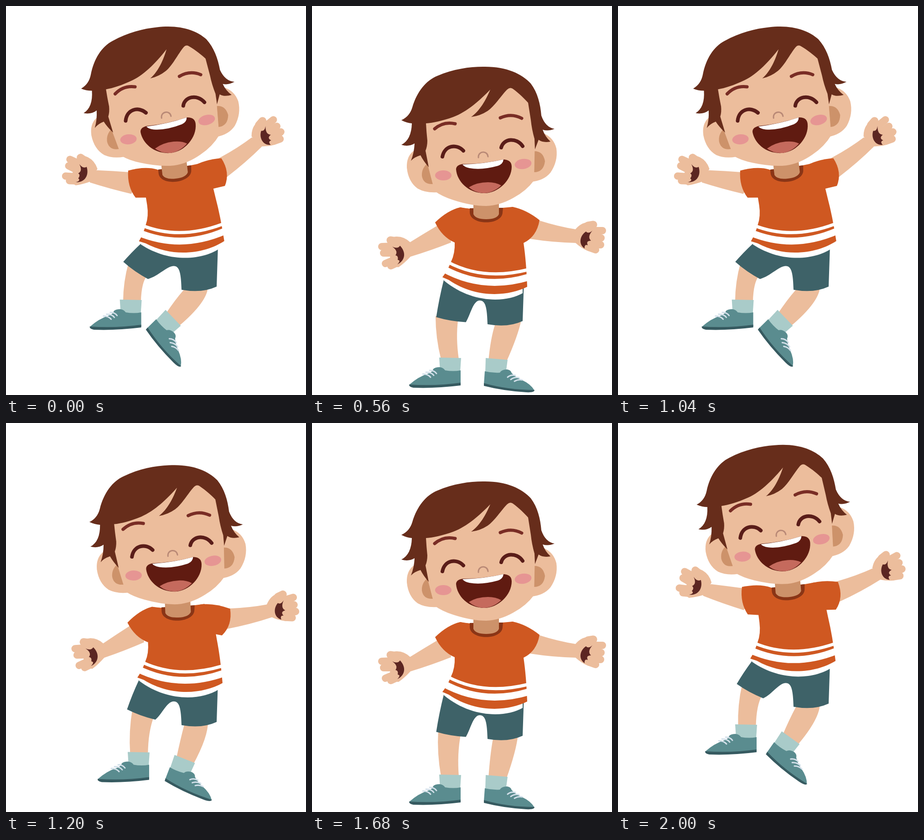
Animation of 658 by 852 pixels, one loop 2.08 s. Source, as an HTML page with a canvas:

```html
<!DOCTYPE html>
<html lang="en">
<head>
<meta charset="utf-8">
<title>Jumping boy</title>
<style>
html, body { margin: 0; width: 100%; height: 100%; overflow: hidden; background: #fff; }
canvas { display: block; }
</style>
</head>
<body>
<canvas id="c" width="658" height="852"></canvas>
<script>
const ctx = document.getElementById('c').getContext('2d');
const SKIN = '#ecbd9c', SHADE = '#cd926a', HAIR = '#672d1b', SHIRT = '#cf5821',
  COLLAR = '#8a3516', SHORTS = '#3e6268', SOCK = '#a9cbc9', SHOE = '#5a8c8f',
  SOLE = '#365a60', LACE = '#d3e0ea', DARK = '#5c2622', WHITE = '#fff';

const STEP = 80;
// One jump, one value per step, measured from the crouch.
const JUMP = {
  body:  [-89.5, -67, -41, -19, -6, 1, 2.5, 0, -5, -18, -44, -71, -86],
  feet:  [-127, -92, -49.5, -13, 0, 0, 0, 0, 0, -13, -48, -83, -110],
  swing: [41.4, 29, 17, 5.2, 0, 0, 0, 0, 0, 4, 11, 20, 31],
  left:  [34.5, 20, -2, -6.5, -5, -3, -1, 0, 0, 5, 17, 29, 38.5],
  right: [-46, -34, -19.6, -5, 0, 1, 1, 0, 0, -5, -13, -22, -33.4],
  knee:  [0, 0, 0, 0, 0.5, 1, 1.15, 1, 0.55, 0, 0, 0, 0]
};
const COUNT = JUMP.body.length;

function fill(d, color) {
  ctx.fillStyle = color;
  ctx.fill(new Path2D(d));
}

function line(d, color, width) {
  ctx.strokeStyle = color;
  ctx.lineWidth = width;
  ctx.stroke(new Path2D(d));
}

function oval(x, y, rx, ry, tilt, color) {
  ctx.fillStyle = color;
  ctx.beginPath();
  ctx.ellipse(x, y, rx, ry, tilt, 0, Math.PI * 2);
  ctx.fill();
}

// A joint moves its rest point (px, py) to (x, y) and turns around it.
function joint(px, py, x, y, deg) {
  const r = deg * Math.PI / 180, c = Math.cos(r), s = Math.sin(r);
  return {
    point: (a, b) => [x + (a - px) * c - (b - py) * s, y + (a - px) * s + (b - py) * c],
    draw(fn) {
      ctx.save();
      ctx.translate(x, y);
      ctx.rotate(r);
      ctx.translate(-px, -py);
      fn();
      ctx.restore();
    }
  };
}

// Hangs a part on its parent at a rest point, with its own angle.
const hang = (parent, px, py, deg) => joint(px, py, ...parent.point(px, py), deg);

function leftHand() {
  fill('M216 518Q203 505 186 505Q170 505 168 525L172 556Q176 572 190 572Q203 563 216 549Z', SKIN);
  line('M185 515L172 513', SKIN, 17);
  line('M180 526L153 527M178 541L157 541', SKIN, 16);
  line('M180 556L161 564M188 562L173 569', SKIN, 16);
  fill('M176 527Q188 533 193 525C206 538 206 557 187 566Q196 557 188 556Q190 547 183 546Q190 537 176 527Z', DARK);
}

function rightHand() {
  fill('M577 490Q590 474 606 474Q620 478 622 495L620 525Q616 540 604 536Q590 530 577 518Z', SKIN);
  line('M605 481L617 479', SKIN, 17);
  line('M612 492L637 492M612 508L634 508', SKIN, 16);
  line('M612 523L633 523M608 529L622 534', SKIN, 16);
  fill('M615 492Q606 500 601 494C587 503 584 522 598 531Q597 521 605 524Q600 514 612 514Q603 506 615 492Z', DARK);
}

function leftShoe() {
  fill('M279 770L327 771L325 801L281 801Z', SOCK);
  fill('M214 829Q233 812 255 805Q265 801 266 795Q270 791 280 791Q288 792 292 798Q310 801 326 798V829L218 834Z', SHOE);
  fill('M213 829Q270 833 326 825V831Q270 838 222 836Q212 834 213 829Z', SOLE);
  line('M243 806Q254 806 260 813M250 802Q262 802 267 809M258 798Q268 798 273 805', LACE, 3);
}

function rightShoe() {
  fill('M381 771L429 775L425 805L380 803Z', SOCK);
  fill('M377 828L379 800Q395 804 412 803Q416 796 428 796Q436 797 438 804Q445 812 460 819Q480 828 488 842L470 845Q420 840 377 829Z', SHOE);
  fill('M377 826Q430 841 488 841Q488 847 470 846Q420 843 377 832Z', SOLE);
  line('M429 813Q436 807 446 809M436 818Q444 812 454 814M444 822Q452 817 461 819', LACE, 3);
}

function torso() {
  fill('M462 610V629C425 650 350 652 289 601L300 590Z', WHITE);
  fill('M310 450L325 441Q336 444 347 444L418 442Q430 441 440 440L455 446L464 519Q470 560 472 615' +
    'C430 636 360 641 300 600L286 594Q297 580 305 560Q314 542 313 517Z', SHIRT);
  ctx.lineCap = 'butt';
  line('M298 561Q375 602 472 578', WHITE, 7);
  line('M287 575Q375 624 475 594', WHITE, 15);
  ctx.lineCap = 'round';
}

function neck() {
  fill('M346 443V452C347 481 417 481 418 452L419 442Z', COLLAR);
  fill('M354 425H410V456Q405 467 382 467Q359 467 354 456Z', SHADE);
}

function head() {
  fill('M250 310L222 318Q207 330 208 354Q211 385 232 400Q250 410 275 408L290 350Z', SKIN);
  fill('M480 285L508 279Q530 288 536 312Q540 340 523 365Q508 383 480 385Z', SKIN);
  fill('M253 345Q240 356 241 372Q244 391 265 390Z', SHADE);
  fill('M488 318Q507 318 511 340Q508 364 487 364Z', SHADE);
  fill('M245 240L380 165L440 165L480 205L489 290L487 382Q470 405 442 420Q412 437 382 438' +
    'Q350 438 310 425Q285 417 270 406Q258 370 249 315Z', SKIN);
  fill('M196 250Q214 242 220 222C230 188 250 163 275 153C310 138 345 133 375 133' +
    'C425 132 460 148 480 170C495 190 501 215 503 240Q512 266 532 269Q518 275 506 271' +
    'Q511 286 523 297Q506 300 497 293Q494 301 489 314L488 291Q482 270 480 250L474 212' +
    'C466 203 455 192 440 181Q434 177 428 183C415 196 400 220 385 230Q368 241 349 243' +
    'C368 230 382 205 391 183C370 205 340 232 310 243C285 252 265 256 250 257' +
    'Q251 276 253 295Q253 307 249 317L256 353Q244 339 238 327Q224 331 217 339' +
    'Q224 322 225 301Q212 309 196 304Q218 293 219 257Q207 256 196 250Z', HAIR);

  line('M269 269Q289 252 314 258M413 245Q437 234 460 246', '#792d25', 7);
  line('M286 330C291 305 317 301 332 317M415 310C420 290 448 287 462 307', '#5a1d19', 8);
  line('M365 332C364 317 385 316 386 330', '#b98976', 3);

  fill('M331 346Q378 346 420 336Q438 337 438 352C438 382 408 410 378 410' +
    'C343 410 318 384 316 358Q316 348 331 346Z', '#601b11');
  fill('M344 397Q362 386 386 386Q403 386 415 393Q398 409 377 410Q357 409 344 397Z', '#c56a5d');
  fill('M330 347Q378 346 420 336Q419 346 408 350Q372 360 345 355Q333 352 330 347Z', WHITE);
  oval(288, 371, 18, 11, 0, '#e69593');
  oval(463, 346, 18.5, 11, -0.15, '#e69593');
}

function legs(pose, hem, lift, heel) {
  const { swing, feet, knee } = pose;
  const hipShift = 3 - 13 * knee;

  const [ax, ay] = hem.point(-25, -4), [bx, by] = hem.point(25, -4);
  const fx = -0.63 * swing, my = (ay + 774 + feet) / 2;
  const lx = 283 + fx, rx = 322 + fx, y = 774 + feet;
  fill(`M${ax + hipShift} ${ay}Q${(ax + hipShift + lx) / 2 - 6} ${my} ${lx} ${y}` +
    `H${rx}Q${(bx + hipShift + rx) / 2 - 6} ${my} ${bx + hipShift} ${by}Z`, SKIN);

  const top = 688 + lift, tl = 391 + 11 * knee, tr = 443 + 16 * knee;
  const [p, q] = heel.point(387, 778), [u, v] = heel.point(426, 780);
  fill(`M${tl} ${top}V${top + 8}Q${(tl + p) / 2 - 3 * knee} ${(top + q) / 2 - 6 * knee} ${p} ${q}` +
    `L${u} ${v}Q${tr + 1 - 8 * knee} ${top + 34} ${tr} ${top}Z`, SKIN);
}

function shorts(hem, lift, waist) {
  const [ax, ay] = hem.point(-33, 0), [bx, by] = hem.point(33, 0);
  const [mx, my] = hem.point(0, 4);
  const c = 645 + lift;
  fill(`M${waist}Q${(waist[0] + ax) / 2 - 2} ${(waist[1] + ay) / 2} ${ax} ${ay}` +
    `Q${mx} ${my} ${bx} ${by}` +
    `C${(bx + 358) / 2} ${(by + c + 15) / 2} 353 ${c} 368 ${c}` +
    `C381 ${c} 384 ${c + 17} 385 ${c + 52}` +
    `Q430 ${c + 60} 462 ${c + 45}L465 ${c - 45}Z`, SHORTS);
}

function render(pose) {
  const { body, feet, swing, left, right } = pose;
  const lean = -0.16 * swing;
  const lift = body - 2.1 * lean;

  const trunk = joint(378, 620, 378 - 1.2 * lean, 620 + body, lean);
  const skull = hang(trunk, 383, 430, 0.87 * lean);
  const hem = joint(0, 0, 305 - 0.5 * swing, 687 + lift - 0.78 * swing, 9.5 + 0.61 * swing);
  const toe = joint(0, 0, -0.71 * swing, feet, 0);
  const heel = joint(377, 829, 377 - 1.65 * swing, 829 + 0.965 * feet, swing);

  // Sleeves and hands turn a little less than the arms.
  const sleeveL = hang(trunk, 332, 472, 0.84 * left);
  const sleeveR = hang(trunk, 439, 471, 0.92 * right);
  const armL = hang(trunk, 332, 472, left);
  const armR = hang(trunk, 439, 471, right);
  const handL = hang(armL, 190, 542, 0.78 * left);
  const handR = hang(armR, 603, 510, 0.85 * right);

  ctx.fillStyle = WHITE;
  ctx.fillRect(0, 0, 658, 852);
  ctx.lineCap = ctx.lineJoin = 'round';

  legs(pose, hem, lift, heel);
  toe.draw(leftShoe);
  heel.draw(rightShoe);
  shorts(hem, lift, trunk.point(289, 600));
  armL.draw(() => fill('M300 466L275 481Q243 500 214 518L205 535L216 549Q262 535 305 518Z', SKIN));
  armR.draw(() => fill('M480 464L499 470Q540 483 578 489L588 505L579 519Q530 518 478 510Z', SKIN));
  handL.draw(leftHand);
  handR.draw(rightHand);
  trunk.draw(torso);
  sleeveL.draw(() => fill('M325 441Q298 447 270 474Q285 506 313 518L345 500V444Z', SHIRT));
  sleeveR.draw(() => fill('M440 440Q470 446 499 469Q493 505 464 519L430 500L425 444Z', SHIRT));
  trunk.draw(neck);
  skull.draw(head);
}

const start = performance.now();
function tick(now) {
  const i = Math.floor(Math.max(0, now - start) / STEP) % COUNT;
  const pose = {};
  for (const key in JUMP) pose[key] = JUMP[key][i];
  render(pose);
  requestAnimationFrame(tick);
}
tick(start);
</script>
</body>
</html>
```
